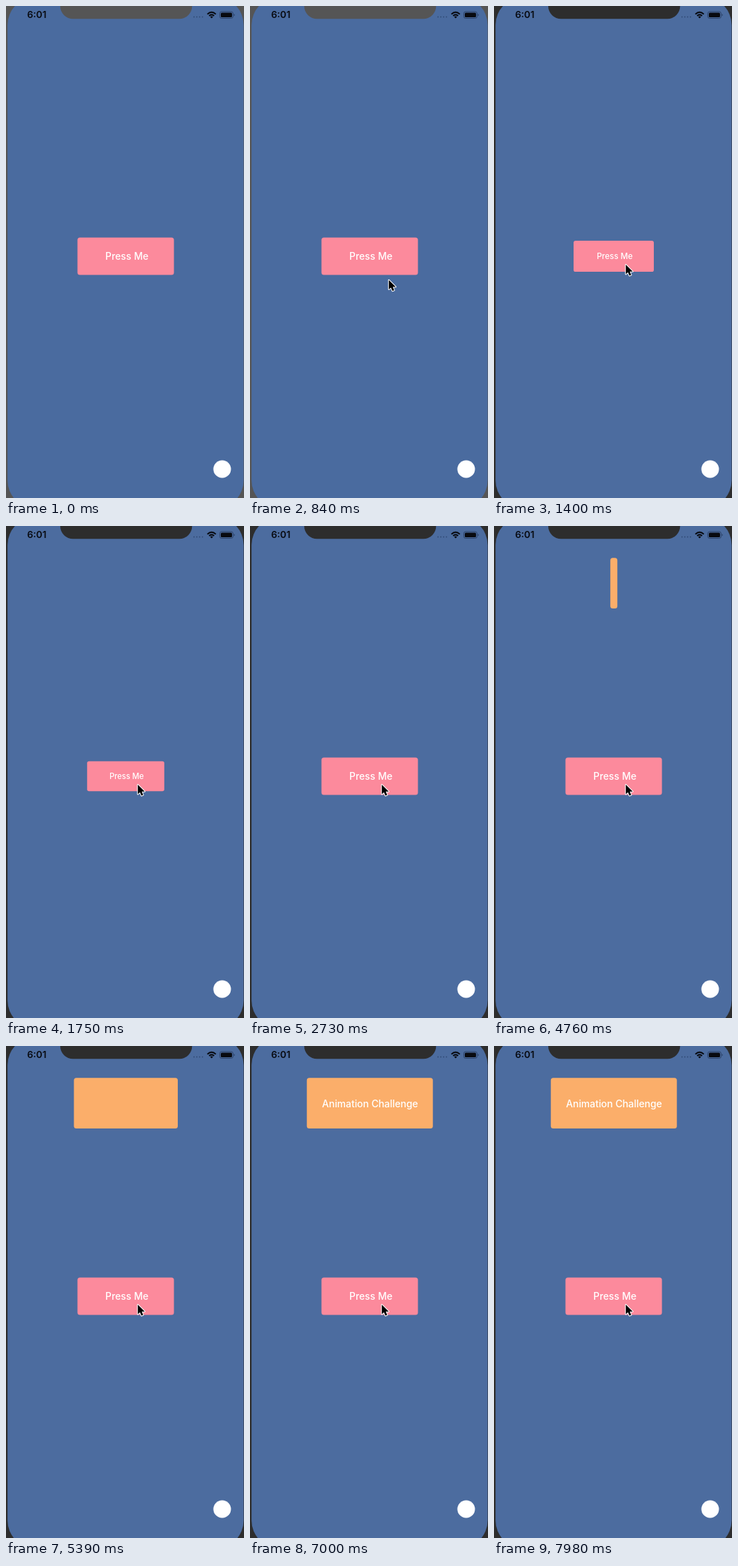
Write an HTML page that moves like this. It is 338 px wide and 698 px high and loops after 8 s.

```html
<!DOCTYPE html>
<html lang="en">
<head>
<meta charset="utf-8">
<title>Spring button</title>
<style>
  html, body { margin: 0; width: 100%; height: 100%; overflow: hidden; background: #2d2d2d; }
  svg { display: block; width: 100%; height: 100%; }
  text { font-family: Inter, Roboto, sans-serif; }
  .label { fill: #fff; font-size: 13.8px; font-weight: 500; text-anchor: middle; }
</style>
</head>
<body>
<svg viewBox="0 0 338 698" xmlns="http://www.w3.org/2000/svg">
  <rect id="bezel" width="338" height="698"/>
  <rect id="screen" x="2.2" y="-13" width="335.3" height="726" rx="40"/>
  <path id="notch" d="M77 -1V0A18.3 18.3 0 0 0 95.3 18.3H246A18.3 18.3 0 0 0 264.3 0V-1Z"/>

  <g id="status" fill="#080a10">
    <text x="30" y="17.4" font-size="13.4" font-weight="600">6:01</text>
    <g fill="#344f7c">
      <circle cx="267" cy="15.5" r="1"/><circle cx="271" cy="15.5" r="1"/>
      <circle cx="275" cy="15.5" r="1"/><circle cx="279" cy="15.5" r="1"/>
    </g>
    <g fill="none" stroke="#080a10" stroke-width="2">
      <path d="M286 11.6Q292 5.9 298 11.6"/>
      <path d="M288.5 14Q292 10.8 295.5 14"/>
    </g>
    <path d="M290 15.4Q292 13.8 294 15.4L292 17.5Z"/>
    <rect x="303.5" y="8" width="19" height="9.5" rx="2.8" fill="none" stroke="#2c4268"/>
    <rect x="305" y="9.5" width="16" height="6.5" rx="1.5"/>
    <path d="M323.8 11V14.5Q325 14 325 12.75T323.8 11Z" fill="#2c4268"/>
  </g>

  <rect id="card" y="45.3" rx="3.5" fill="#fbae6a"/>
  <text id="title" class="label" x="170.5" y="86.5">Animation Challenge</text>

  <g id="button">
    <rect x="-68.5" y="-26.5" width="137" height="53" rx="3.5" fill="#fc8a9c"/>
    <text class="label" x="1.7" y="5.2">Press Me</text>
  </g>

  <circle cx="307" cy="657" r="12.5" fill="#fff"/>
  <path id="cursor" d="M0 0V13.4L3 10.7L5.2 15.6L7.6 14.6L5.6 9.7H9.8Z"
        fill="#000" stroke="#fff" stroke-width="2" stroke-linejoin="round" paint-order="stroke"/>
</svg>
<script>
const LOOP = 8000;
const PRESS = 1240, RELEASE = 1790, GROW = 3965, WIDEN = 5237, REVEAL = 6605;
const $ = id => document.getElementById(id);
const [bezel, screen, notch, card, title, button, cursor] =
  ['bezel', 'screen', 'notch', 'card', 'title', 'button', 'cursor'].map($);

const set = (el, attrs) => {
  for (const key in attrs) el.setAttribute(key, attrs[key]);
};
const clamp = x => Math.min(1, Math.max(0, x));
const ease = x => x * x * (3 - 2 * x);

// Underdamped step response: tension 230.2, friction 22, mass 1
const DECAY = 11, FREQ = Math.sqrt(230.2 - DECAY * DECAY);
function spring(ms) {
  if (ms <= 0) return 0;
  const s = ms / 1000;
  return 1 - Math.exp(-DECAY * s) *
    (Math.cos(FREQ * s) + DECAY / FREQ * Math.sin(FREQ * s));
}

function draw(t) {
  const active = t >= PRESS;
  const frame = active ? '#2d2d2d' : '#555555';
  set(bezel, { fill: frame });
  set(notch, { fill: frame });
  set(screen, { fill: active ? '#4c6c9f' : '#4a6b9f' });

  const scale = 1 - 0.2 * (spring(t - PRESS) - spring(t - RELEASE));
  set(button, { transform: `translate(170 355) scale(${scale})` });

  const height = 71.7 * spring(t - GROW);
  const width = 10 + 169 * spring(t - WIDEN);
  set(card, { x: 170.2 - width / 2, width, height: Math.max(0, height) });
  set(title, { opacity: clamp(spring(t - REVEAL)) });

  const move = ease(clamp((t - 250) / 700));
  const x = 340 + (187.2 - 340) * move, y = 700 + (367 - 700) * move;
  set(cursor, { transform: `translate(${x} ${y})` });
}

const start = performance.now();
function tick() {
  draw((performance.now() - start) % LOOP);
  requestAnimationFrame(tick);
}
tick();
</script>
</body>
</html>
```
